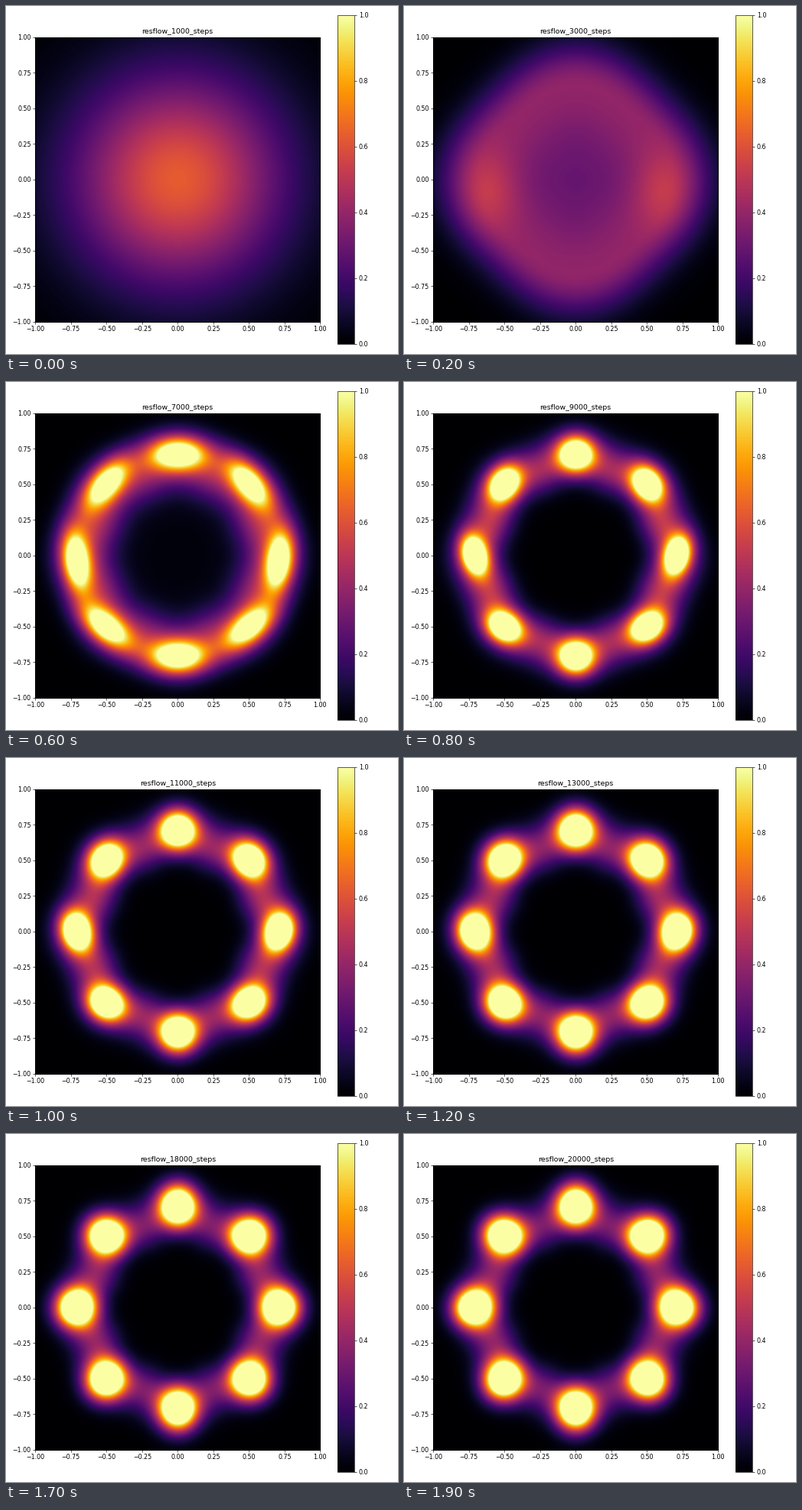
Animation of 512 by 455 pixels, one loop 2 s. Source, as a matplotlib script:

```python
import numpy as np
import matplotlib.pyplot as plt
from matplotlib.animation import FuncAnimation

W, H, DPI = 512, 455, 64
FRAMES, STEP_MS = 20, 100
S = 8 / 9  # point scale: a 9 inch wide layout drawn on 8 inches
PX = 72 / DPI

plt.rcParams.update({
    "font.family": "DejaVu Sans",
    "font.size": 10 * S,
    "axes.titlesize": 12 * S,
    "axes.titlepad": 6 * S,
    "axes.linewidth": 0.8 * S,
})
for axis in ("xtick", "ytick"):
    plt.rcParams.update({
        f"{axis}.labelsize": 10 * S,
        f"{axis}.major.size": 3.5 * S,
        f"{axis}.major.pad": 3.5 * S,
        f"{axis}.major.width": 0.8 * S,
    })

N = 372
pts = (np.arange(N) + 0.5) / N * 2 - 1
X, Y = np.meshgrid(pts, pts)
RAD, ANG = np.hypot(X, Y), np.arctan2(Y, X)


def mix(a, b, t):
    return a + (b - a) * t


def ease(i, start, end):
    t = np.clip((i - start) / (end - start), 0, 1)
    return t * t * (3 - 2 * t)


def approach(i, start, rate):
    return 1 - np.exp(-max(i - start, 0) / rate)


def bell(d, width):
    return np.exp(-(d / width)**2 / 2)


def density(i):
    spread = ease(i, 0, 2)        # central heap opens into a ring
    tighten = ease(i, 2, 4)       # ring gets narrow
    form = ease(i, 4, 8)          # ring breaks into eight modes
    grow = approach(i, 4, 2.5)    # modes rise
    settle = approach(i, 4, 6.5)  # bridges fade

    shape = (1 + .045 * spread * (1 - tighten) * np.cos(4 * ANG)
             + .05 * settle * np.cos(8 * ANG))
    radius = mix(mix(.63 * spread, .69, tighten), .65, settle)
    height = mix(mix(mix(.63, .395, spread), .61, tighten), .32, settle)
    floor = mix(mix(.63, .285, spread), .04, tighten) * (1 - form)
    inner = mix(mix(.24, .19, tighten), .112, form)
    outer = mix(mix(.51, .195, spread), .12, tighten)

    d = RAD / shape - radius
    peak = height * (1 + .1 * form * np.cos(2 * ANG))
    total = np.where(d < 0, mix(floor, peak, bell(d, inner)),
                     peak * bell(d, outer))

    orbit = mix(.61, .71, tighten)
    along = mix(mix(.2, .17, tighten), .086, form)
    across = mix(mix(.15, .07, tighten), .1, settle)
    for a in np.arange(8) * np.pi / 4:
        axial = np.cos(2 * a)**2
        side = np.cos(a)**2
        early = axial * mix(.13 * spread * side, .22, tighten)
        squeeze = .5 * form * (1 - settle) * side
        dx = X - orbit * np.cos(a)
        dy = Y - orbit * np.sin(a) + .08 * axial * side * (1 - form)
        tilt = a - .28 * np.cos(a) * form
        u = dx * np.cos(tilt) + dy * np.sin(tilt)
        v = dy * np.cos(tilt) - dx * np.sin(tilt)
        total = total + (mix(early, 1.55, grow)
                         * bell(u, across * (1 - squeeze))
                         * bell(v, along * (1 + .4 * squeeze)))
    return total


def place(left, top, width, height):
    return fig.add_axes([left / W, 1 - (top + height) / H, width / W, height / H])


fig = plt.figure(figsize=(W / DPI, H / DPI), dpi=DPI, facecolor="white")
ax = place(38.2, 40.6, 372.1, 372.2)
cax = place(433.4, 11.9, 21.8, 430)

img = ax.imshow(density(0), cmap="inferno", vmin=0, vmax=1, origin="lower",
                extent=(-1, 1, -1, 1), interpolation="bilinear", aspect="auto")
ax.spines[:].set_linewidth(PX)
ticks = np.linspace(-1, 1, 9)
ax.set_xticks(ticks)
ax.set_yticks(ticks)
title = ax.set_title("")
bar = fig.colorbar(img, cax=cax)
bar.set_ticks(np.linspace(0, 1, 6))


def draw(i):
    img.set_data(density(i))
    title.set_text(f"resflow_{(i + 1) * 1000}_steps")
    return img, title


anim = FuncAnimation(fig, draw, frames=FRAMES, init_func=lambda: draw(0),
                     interval=STEP_MS, repeat=True, repeat_delay=0, blit=False)
plt.show()
```
